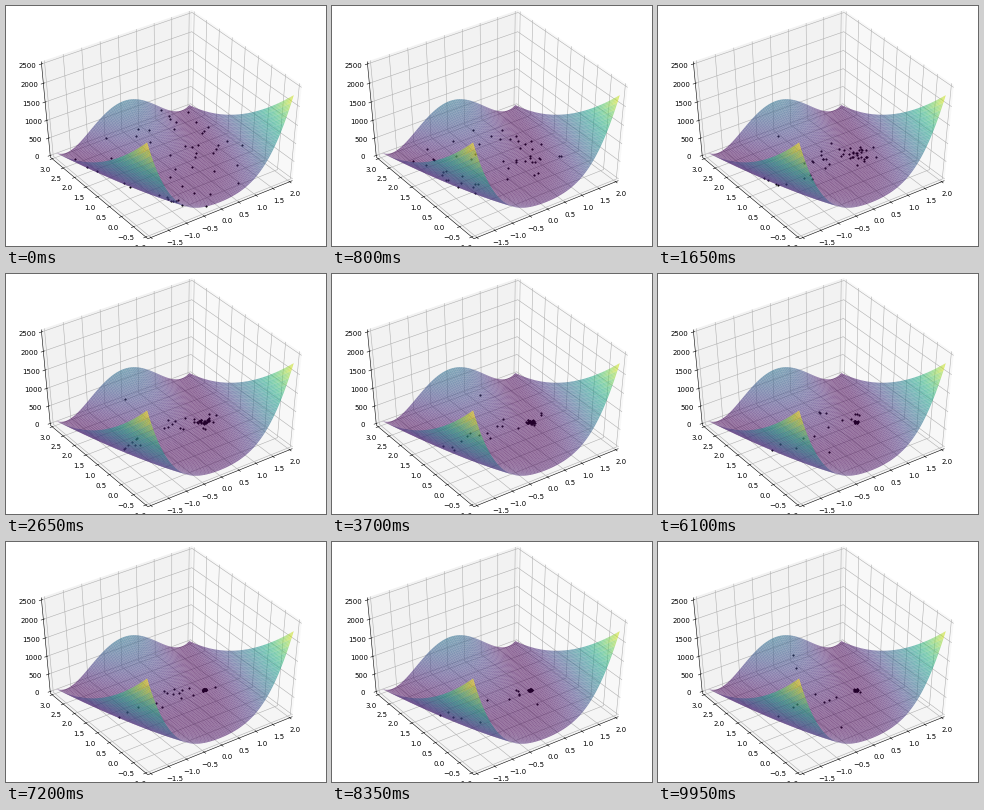
A matplotlib script for the animation above (10000 ms loop, 320 by 240 pixels).

```python
import numpy as np
import matplotlib.pyplot as plt
from matplotlib.animation import FuncAnimation
from matplotlib.collections import LineCollection, PolyCollection

FRAMES, INTERVAL = 200, 50
COUNT = 50
ELEV, AZIM, DIST = np.radians(45), np.radians(-125), 10
EDGE = 0.5 + 1 / 48          # panes sit slightly outside the data limits
LABEL_GAP = 11.5 * 48 / (72 * (6.4 + 4.8)) / 12

plt.rcParams["font.family"] = "DejaVu Sans"


def rosenbrock(x, y):
    return (1 - x) ** 2 + 100 * (y - x ** 2) ** 2


LOW = np.array([-2.0, -1.0, 0.0])
HIGH = np.array([2.0, 3.0, rosenbrock(-2, -1)])

# Camera basis
RIGHT = np.array([-np.sin(AZIM), np.cos(AZIM), 0])
BACK = np.array([np.cos(ELEV) * np.cos(AZIM),
                 np.cos(ELEV) * np.sin(AZIM), np.sin(ELEV)])
UP = np.cross(BACK, RIGHT)


def to_unit(points):
    return (np.asarray(points) - LOW) / (HIGH - LOW) - 0.5


def project(unit):
    unit = np.asarray(unit, float)
    depth = DIST - unit @ BACK
    return np.stack([unit @ RIGHT / depth, unit @ UP / depth], axis=-1)


def draw_panes(ax):
    e = EDGE
    panes = [[(e, -e, -e), (e, e, -e), (e, e, e), (e, -e, e)],
             [(-e, e, -e), (e, e, -e), (e, e, e), (-e, e, e)],
             [(-e, -e, -e), (e, -e, -e), (e, e, -e), (-e, e, -e)]]
    shades = [(g, g, g, 0.5) for g in (0.95, 0.90, 0.925)]
    ax.add_collection(PolyCollection(project(panes), facecolors=shades,
                                     edgecolors="none", zorder=0))


def draw_axis(ax, index, ticks, fmt, path, tick_dir):
    """path holds the three corners each grid line visits, given on the other two axes."""
    others = [i for i in range(3) if i != index]

    def place(corner, value):
        point = np.empty(3)
        point[index] = value
        point[others] = corner
        return point

    grid, marks = [], []
    for tick in ticks:
        t = (tick - LOW[index]) / (HIGH[index] - LOW[index]) - 0.5
        grid.append(project([place(c, t) for c in path]))
        base = place(path[0], t)
        outer, inner = base.copy(), base.copy()
        outer[tick_dir] -= 0.2 / 12
        inner[tick_dir] += 0.1 / 12
        marks.append(project([outer, inner]))
        label = base.copy()
        label[others] += LABEL_GAP * np.sign(base[others])
        text = fmt.format(tick).replace("-", "\u2212")
        ax.text(*project(label), text, fontsize=10, ha="center", va="top",
                zorder=1, clip_on=True)
    marks.append(project([place(path[0], -EDGE), place(path[0], EDGE)]))
    ax.add_collection(LineCollection(grid, colors="#b0b0b0", linewidths=0.8, zorder=0.5))
    ax.add_collection(LineCollection(marks, colors="k", linewidths=0.8, zorder=0.8))


def draw_surface(ax):
    steps = np.arange(80) * 0.05
    x, y = np.meshgrid(LOW[0] + steps, LOW[1] + steps)
    mesh = np.stack([x, y, rosenbrock(x, y)], axis=-1)
    quads = np.stack([mesh[:-1, :-1], mesh[:-1, 1:], mesh[1:, 1:], mesh[1:, :-1]],
                     axis=2).reshape(-1, 4, 3)
    height = quads[..., 2].mean(axis=1)
    unit = to_unit(quads)
    order = np.argsort((unit @ BACK).mean(axis=1))
    shade = (height - height.min()) / np.ptp(height)
    colors = plt.get_cmap("viridis")(shade[order], alpha=0.6)
    ax.add_collection(PolyCollection(project(unit[order]), facecolors=colors,
                                     edgecolors="none", linewidths=0, zorder=3))


def starting_swarm(rng):
    """Uniform candidates, keeping the ones on low ground."""
    pool = rng.uniform(LOW[:2], HIGH[:2], (COUNT * 8, 2))
    return pool[rosenbrock(*pool.T) < 600][:COUNT]


def explore(rng, step):
    """Candidates scattered along the valley, narrowing around y = 1."""
    wild = rng.random(COUNT) < 0.12
    x = rng.uniform(-1.5, 1.4, COUNT)
    width = np.maximum(np.exp(-step / 25), 0.13)
    y = 1.1 + rng.uniform(-1.8, 1.8, COUNT) * np.where(wild, 0.75, width)
    return np.stack([x, y], axis=-1)


def simulate():
    rng = np.random.default_rng(12)
    settle = np.concatenate([rng.uniform(4, 35, 28), rng.uniform(35, 190, 11),
                             np.full(COUNT - 39, np.inf)])
    roam = starting_swarm(rng)
    offset = rng.normal(size=(COUNT, 2))
    history = [roam.copy()]
    for step in range(1, FRAMES):
        renew = (rng.random(COUNT) < 0.3)[:, None]
        roam = np.where(renew, explore(rng, step), roam)
        offset = np.where(renew, rng.normal(size=(COUNT, 2)), offset)
        spread = 0.02 + 0.55 * np.exp(-step / 25)
        swarm = np.where((settle <= step)[:, None], 1 + spread * offset, roam)
        history.append(np.clip(swarm, LOW[:2], HIGH[:2]))
    return history


def screen_dots(swarm):
    x, y = swarm.T
    return project(to_unit(np.stack([x, y, rosenbrock(x, y)], axis=-1))).T


fig = plt.figure(figsize=(6.4, 4.8), dpi=50, facecolor="white")
ax = fig.add_axes([0, 0, 1, 1])
ax.set_axis_off()
ax.set(xlim=(-0.095, 0.09), ylim=(-0.095, 0.09))

e = EDGE
draw_panes(ax)
draw_axis(ax, 0, np.arange(-2, 2.1, 0.5), "{:.1f}", [(-e, -e), (e, -e), (e, e)], 1)
draw_axis(ax, 1, np.arange(-1, 3.1, 0.5), "{:.1f}", [(-e, -e), (e, -e), (e, e)], 0)
draw_axis(ax, 2, np.arange(0, 2501, 500), "{:.0f}", [(-e, e), (e, e), (e, -e)], 0)
draw_surface(ax)

# The dots lie under the translucent surface
tracks = [screen_dots(swarm) for swarm in simulate()]
dots, = ax.plot([], [], "k.", markersize=4, zorder=2)


def update(frame):
    dots.set_data(*tracks[frame])
    return dots,


anim = FuncAnimation(fig, update, frames=FRAMES, interval=INTERVAL,
                     init_func=lambda: update(0), repeat=True, repeat_delay=0)
plt.show()
```
